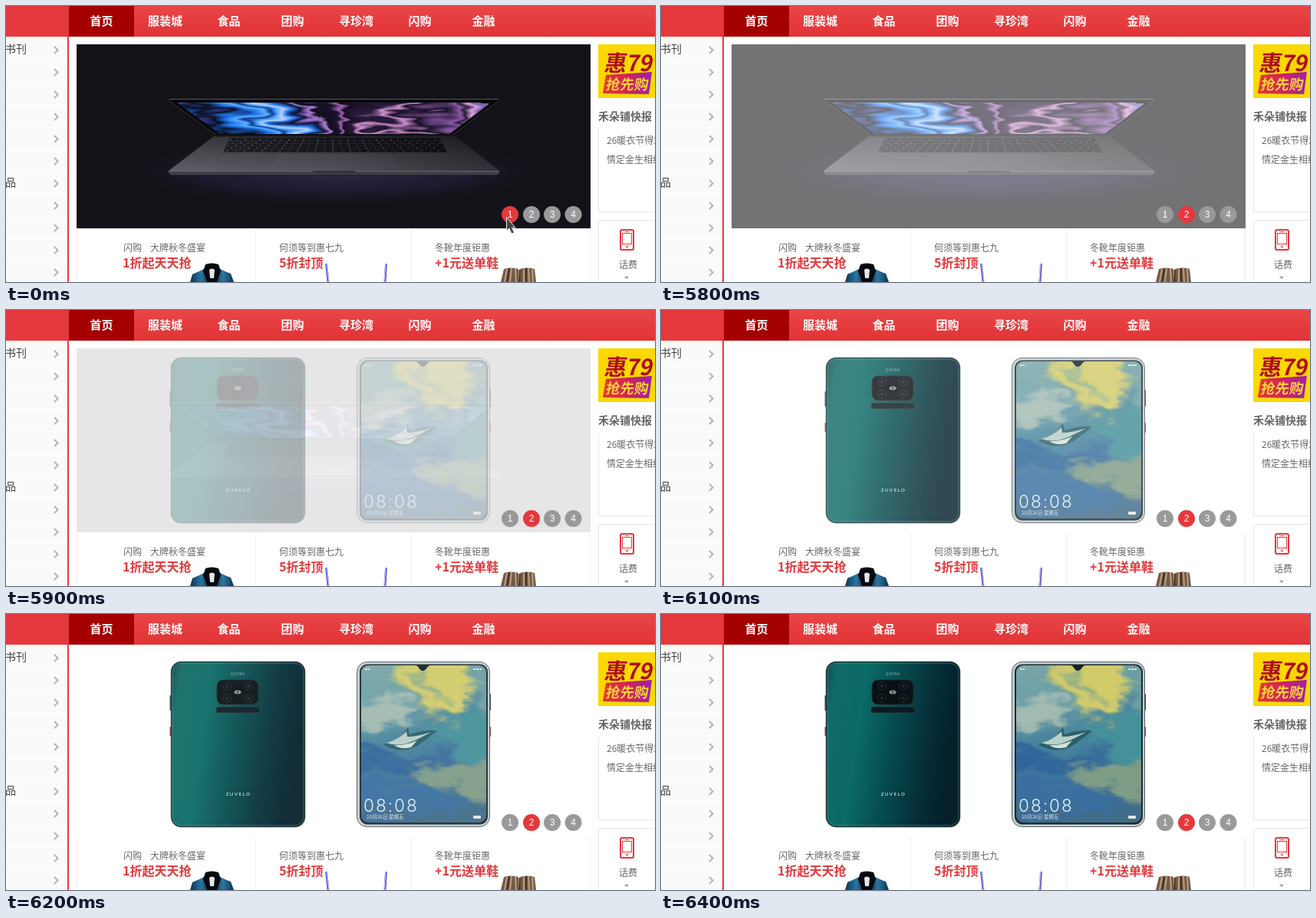
Animation, 846 px wide and 360 px high, one loop 8000 ms. Source, as an HTML page:

```html
<!DOCTYPE html>
<html lang="zh-CN">
<head>
<meta charset="utf-8">
<title>商城首页</title>
<style>
html, body { margin: 0; width: 100%; height: 100%; overflow: hidden; background: #fff; }
svg { display: block; width: 100vw; height: 100vh; font-family: "Noto Sans CJK SC", "Noto Sans CJK", sans-serif; }
.nav { font-size: 15px; font-weight: 700; fill: #fff; text-anchor: middle; }
.side { font-size: 14px; fill: #444; }
.small { font-size: 12px; fill: #666; }
.deal { font-size: 16px; font-weight: 700; fill: #e4393c; }
.page { font: 12px "Liberation Sans", Arial, sans-serif; fill: #fff; text-anchor: middle; }
.clock { font: 300 22.5px Inter, sans-serif; letter-spacing: 2px; fill: #e8f0ee; }
</style>
</head>
<body>
<svg viewBox="0 0 846 360" preserveAspectRatio="none">
  <defs>
    <linearGradient id="bar" x2="0" y2="1"><stop stop-color="#e94547"/><stop offset="1" stop-color="#e13335"/></linearGradient>
    <linearGradient id="deck" x2="0" y2="1"><stop stop-color="#2c2b32"/><stop offset=".55" stop-color="#45434b"/><stop offset="1" stop-color="#55535c"/></linearGradient>
    <linearGradient id="shade"><stop stop-color="#fff" stop-opacity=".06"/><stop offset=".5" stop-color="#000" stop-opacity=".05"/><stop offset="1" stop-color="#000" stop-opacity=".42"/></linearGradient>
    <linearGradient id="flow" x2="1" y2=".12">
      <stop stop-color="#0a0b18"/><stop offset=".07" stop-color="#3a3f9a"/><stop offset=".12" stop-color="#0b0e20"/>
      <stop offset=".17" stop-color="#1d6fe6"/><stop offset=".23" stop-color="#58b4ff"/><stop offset=".27" stop-color="#123a94"/>
      <stop offset=".31" stop-color="#3f9cff"/><stop offset=".36" stop-color="#b9d2ff"/><stop offset=".4" stop-color="#2a7df0"/>
      <stop offset=".45" stop-color="#0b1233"/><stop offset=".49" stop-color="#b07fd8"/><stop offset=".51" stop-color="#120d20"/>
      <stop offset=".57" stop-color="#1b1230"/><stop offset=".6" stop-color="#a868b8"/><stop offset=".62" stop-color="#160e22"/>
      <stop offset=".7" stop-color="#2a1a3c"/><stop offset=".73" stop-color="#d090d0"/><stop offset=".76" stop-color="#170f24"/>
      <stop offset=".84" stop-color="#8a5aa8"/><stop offset=".88" stop-color="#2a1a3a"/><stop offset=".94" stop-color="#d8a0dc"/><stop offset="1" stop-color="#7a62b4"/>
    </linearGradient>
    <radialGradient id="glow"><stop stop-color="#332f52" stop-opacity=".8"/><stop offset=".6" stop-color="#242140" stop-opacity=".55"/><stop offset="1" stop-color="#14131a" stop-opacity="0"/></radialGradient>
    <linearGradient id="back" x2="1" y2=".18"><stop stop-color="#0c4a4a"/><stop offset=".08" stop-color="#126a66"/><stop offset=".3" stop-color="#0b6b66"/><stop offset=".55" stop-color="#064c4f"/><stop offset=".8" stop-color="#05303a"/><stop offset="1" stop-color="#04202b"/></linearGradient>
    <linearGradient id="paint" x2=".25" y2="1"><stop stop-color="#86aaa8"/><stop offset=".3" stop-color="#6a9fa6"/><stop offset=".55" stop-color="#46839c"/><stop offset=".8" stop-color="#3a6c98"/><stop offset="1" stop-color="#426c84"/></linearGradient>
    <linearGradient id="ribbon"><stop stop-color="#e43a2c"/><stop offset=".5" stop-color="#cf2260"/><stop offset="1" stop-color="#9c22a8"/></linearGradient>
    <linearGradient id="coat"><stop stop-color="#0f3352"/><stop offset=".25" stop-color="#2a76a2"/><stop offset=".5" stop-color="#0d2236"/><stop offset=".75" stop-color="#2a76a2"/><stop offset="1" stop-color="#0f3352"/></linearGradient>
    <filter id="marble" x="0" y="0" width="1" height="1" color-interpolation-filters="sRGB">
      <feTurbulence type="fractalNoise" baseFrequency=".008 .045" numOctaves="3" seed="8"/>
      <feDisplacementMap in="SourceGraphic" scale="190" xChannelSelector="R" yChannelSelector="G"/>
    </filter>
    <filter id="brush" x="0" y="0" width="1" height="1" color-interpolation-filters="sRGB">
      <feGaussianBlur in="SourceGraphic" stdDeviation="5" result="base"/>
      <feTurbulence type="fractalNoise" baseFrequency=".02 .04" numOctaves="4" seed="3"/>
      <feDisplacementMap in="base" scale="60" xChannelSelector="R" yChannelSelector="G"/>
    </filter>
    <filter id="soft"><feGaussianBlur stdDeviation=".7"/></filter>
    <clipPath id="lcd"><path d="M223 126H632L578 167H279Z"/></clipPath>
    <clipPath id="glass"><rect x="463" y="67" width="163" height="205" rx="9"/></clipPath>
    <clipPath id="ad"><rect x="772" y="50" width="74" height="70"/></clipPath>
  </defs>

  <rect width="846" height="360" fill="#fff"/>

  <rect width="846" height="40" fill="url(#bar)"/>
  <rect width="82" height="40" fill="#e4393c"/>
  <rect x="82" width="85" height="40" fill="#a40000"/>
  <g id="nav"></g>

  <rect y="40" width="80" height="320" fill="#fafafa"/>
  <g id="side"></g>
  <rect x="80" y="40" width="2" height="320" fill="#e4393c"/>
  <text class="side" x="-1" y="61">书刊</text>
  <text class="side" x="-1" y="235">品</text>

  <g id="laptop">
    <rect x="92" y="50" width="670" height="240" fill="#131218"/>
    <ellipse cx="430" cy="216" rx="290" ry="46" fill="url(#glow)"/>
    <path d="M214 121H641L643 124L584 169H272L212 124Z" fill="#08080b"/>
    <path d="M213 121.500H642" stroke="#5c5a62"/>
    <path d="M212 123L273 168M643 123L583 168" stroke="#3c3a42"/>
    <g clip-path="url(#lcd)">
      <rect x="123" y="26" width="610" height="242" fill="#0d0a16"/>
      <path d="M223 26H632V268H223Z" fill="url(#flow)" filter="url(#marble)"/>
    </g>
    <path d="M272 169H584L643 215H212Z" fill="url(#deck)"/>
    <path d="M292 172H565L575 191H283Z" fill="#121218"/>
    <g id="keys"></g>
    <path d="M354 193H502L512 213H344Z" fill="#5a5861" opacity=".25"/>
    <path d="M272 169H584L643 215H212Z" fill="url(#shade)"/>
    <rect x="408" y="167" width="13" height="4" fill="#060608"/>
    <path d="M272 169.500H584" stroke="#1b1a20" stroke-width="2"/>
    <path d="M212 215H643V218L638 221H217L212 218Z" fill="#403e48"/>
    <path d="M212 215.500H643" stroke="#66646e"/>
    <path d="M215 220.500H640" stroke="#25232d"/>
    <rect x="400" y="215" width="55" height="3" fill="#34323b"/>
  </g>

  <g id="phones">
    <rect x="213.500" y="106" width="3" height="20" rx="1" fill="#27494c"/>
    <rect x="213.500" y="147" width="3" height="12" rx="1" fill="#8a3a38"/>
    <rect x="215.500" y="62.500" width="174" height="215" rx="13" fill="url(#back)" stroke="#20393d" stroke-width="1.500"/>
    <rect x="217.500" y="64.500" width="170" height="211" rx="11" fill="none" stroke="#5ea09b" stroke-opacity=".35"/>
    <text x="302" y="80" font-size="5" fill="#8fb0ae" text-anchor="middle" letter-spacing=".4">QOVRA</text>
    <rect x="275" y="86" width="54" height="32" rx="8" fill="#0a1014" stroke="#1d2c30"/>
    <g id="lenses"></g>
    <rect x="274" y="121" width="57" height="8" rx="2" fill="#0b1c21" stroke="#2c4a4d" stroke-width=".7"/>
    <text x="303" y="236.500" font-family="Lato, sans-serif" font-size="6" font-weight="700" fill="#c3d3d1" text-anchor="middle" letter-spacing="1.500">ZUVELO</text>

    <rect x="629" y="104" width="3" height="22" rx="1" fill="#39484c"/>
    <rect x="629" y="147" width="3" height="13" rx="1" fill="#a03836"/>
    <rect x="457.500" y="62.500" width="173" height="215" rx="13" fill="#c3cdcf" stroke="#566166"/>
    <rect x="461" y="65.500" width="167" height="209" rx="10" fill="#1f2a2e"/>
    <g clip-path="url(#glass)">
      <g filter="url(#brush)">
        <rect x="432" y="37" width="224" height="266" fill="url(#paint)"/>
        <path d="M496 40H592L606 100L590 138L555 128L520 100Z" fill="#d2cb6a"/>
        <path d="M520 66L546 96L580 118L570 90Z" fill="#8fae88"/>
        <path d="M604 40H656V150L616 132Z" fill="#6d9ea4"/>
        <path d="M432 130L490 100L545 128L470 150Z" fill="#a2bbb0"/>
        <path d="M550 150L656 128V182L590 186Z" fill="#45919a"/>
        <path d="M432 172L520 192L570 184L600 208L470 206Z" fill="#2f659a"/>
        <path d="M520 205L600 190L656 175V240L580 236Z" fill="#7f9c86"/>
        <path d="M432 214L540 224L620 262L432 256Z" fill="#3a6fa0"/>
      </g>
      <g filter="url(#soft)">
        <path d="M491 170Q506 168 514 160L524 148L526 157Q544 151 562 152Q548 164 536 172Q514 184 491 170Z" fill="#2a5f68"/>
        <path d="M496 168Q510 165 522 153L523 160Q536 160 554 154Q540 162 530 166Q512 174 496 168Z" fill="#b9cec6"/>
        <path d="M506 171Q520 172 536 165L528 174Q514 177 506 171Z" fill="#d6e2d8"/>
      </g>
      <path d="M530 66Q537 67 538 70Q543 78 549 70Q550 67 557 66Z" fill="#182226"/>
      <path d="M468 72H474M609 72H620" stroke="#dce6e4" stroke-width="2" stroke-dasharray="3 1"/>
      <text class="clock" x="466" y="258">08:08</text>
      <text x="470" y="267" font-size="6.500" fill="#e3ecea">10月26日 星期五</text>
      <rect x="609" y="263" width="10" height="4" rx="1" fill="#dde7e2"/>
    </g>
  </g>

  <g id="pager"></g>

  <path d="M92.500 291V360M325.500 291V360M528.500 291V360M761.500 291V360" stroke="#eee"/>
  <text class="small" x="153" y="320">闪购</text>
  <text class="small" x="188" y="320">大牌秋冬盛宴</text>
  <text class="deal" x="152" y="341">1折起天天抢</text>
  <text class="small" x="356" y="320">何须等到惠七九</text>
  <text class="deal" x="356" y="341">5折封顶</text>
  <text class="small" x="559" y="320">冬靴年度钜惠</text>
  <text class="deal" x="559" y="341">+1元送单鞋</text>

  <path d="M240 360L243 350Q250 347 258 343H279Q287 347 293 349L297 360Z" fill="url(#coat)"/>
  <path d="M257 346L260 337Q268 334 277 337L280 346L275 360H262Z" fill="#07090d"/>
  <path d="M265 344Q268 341 272 344L271 355H266Z" fill="#e4e8ec"/>
  <path d="M417.500 336L420 360M495.500 336L494 360" stroke="#6a6ad2" stroke-width="3"/>
  <path d="M418.500 336L421 360M494.500 336L493 360" stroke="#c9c9f2"/>
  <path d="M645 360L649 343Q659 340 668 343L669 360ZM670 360V343Q680 340 689 343L691 360Z" fill="#765a44"/>
  <path d="M653 343L650 360M659 342L657 360M664 342L665 360M675 343V360M681 342L682 360M686 343L687 360" stroke="#b9a288" stroke-width="2"/>
  <path d="M656 343L653 360M678 342V360M669.500 344V360" stroke="#33271f" stroke-width="1.500"/>

  <g clip-path="url(#ad)">
    <rect x="772" y="50" width="74" height="70" fill="#fbd800"/>
    <text transform="translate(779 85) skewX(-10)" font-size="29" font-weight="900" fill="#b00d16">惠79</text>
    <path d="M782 90L842 86L838 115L778 114Z" fill="url(#ribbon)"/>
    <text transform="translate(781 109) skewX(-10)" font-size="18.500" font-weight="700" fill="#ffd238">抢先购</text>
  </g>
  <text x="772" y="149" font-size="14" font-weight="700" fill="#666">禾朵铺快报</text>
  <path d="M846 268.500H772.500V160M846 279.500H772.500V360" fill="none" stroke="#e6e6e6"/>
  <text class="small" x="783" y="180">26暖衣节得2</text>
  <text class="small" x="783" y="205">情定金生相约</text>
  <g fill="none" stroke="#e4393c">
    <rect x="801" y="292" width="17" height="26" rx="2" stroke-width="2"/>
    <rect x="803.500" y="296.500" width="12" height="14"/>
    <path d="M807 294.500H812"/>
    <circle cx="809.500" cy="314" r="1.200"/>
  </g>
  <text class="small" x="799" y="342">话费</text>
  <path d="M806 353H812L809 356Z" fill="#999"/>

  <path id="cursor" d="M652.500 275.500V293L656 290L659 297L662.500 295.500L659.500 289H664Z" fill="#444" stroke="#eee"/>
</svg>
<script>
const $ = id => document.getElementById(id);
const fill = (id, list, draw) => { $(id).innerHTML = list.map(draw).join(''); };
const range = n => [...Array(n).keys()];

fill('nav', ['首页', '服装城', '食品', '团购', '寻珍湾', '闪购', '金融'],
  (s, i) => `<text class="nav" x="${124.5 + 83 * i}" y="25">${s}</text>`);

fill('side', range(11), i => {
  const y = 57.5 + 29 * i;
  return `<rect y="${y + 13.5}" width="80" height="1" fill="#fff"/>
    <path d="M63 ${y - 4.5}L67.500 ${y}L63 ${y + 4.5}" fill="none" stroke="#b4b4b4" stroke-width="2"/>`;
});

fill('keys', range(5), i => {
  const y = 174.5 + 3.6 * i, d = 2 * i;
  return `<path d="M${292 - d} ${y}H${565 + d}" stroke="#6a6874" stroke-dasharray="2 ${7 + i} 1 9" stroke-dashoffset="${i * 5}"/>
    <path d="M${292 - d} ${y + 1.5}H${565 + d}" stroke="#33323c" stroke-width=".7"/>`;
});

fill('lenses', [[288, 94], [316, 94], [288, 110], [316, 110]], ([x, y]) =>
  `<circle cx="${x}" cy="${y}" r="5.500" fill="#0c1418" stroke="#1c282d"/><circle cx="${x}" cy="${y}" r="1.500" fill="#26353c"/>`);
$('lenses').innerHTML += '<ellipse cx="302" cy="102" rx="4.500" ry="2.500" fill="#8d9a9a"/><circle cx="302" cy="102" r="1.500" fill="#3c494b"/>';

fill('pager', [657, 685, 712, 739.5], (x, i) =>
  `<circle cx="${x}" cy="272" r="11"/><text class="page" x="${x}" y="276">${i + 1}</text>`);
const dots = $('pager').querySelectorAll('circle');

const LOOP = 8000, HIDE = 700, SWAP = 5800, STEP = 100;
const fadeOut = [.59, .1];
const fadeIn = [0, .28, .62, .82, .94, .98, 1];

function render(t) {
  const n = Math.floor((t - SWAP) / STEP);
  const swapped = n >= 0;
  $('cursor').style.display = t < HIDE ? '' : 'none';
  $('laptop').style.opacity = swapped ? fadeOut[n] ?? 0 : 1;
  $('phones').style.opacity = swapped ? fadeIn[n] ?? 1 : 0;
  dots.forEach((dot, i) => dot.setAttribute('fill', i === +swapped ? '#e4393c' : '#999'));
}

const start = performance.now();
function tick() {
  render((performance.now() - start) % LOOP);
  requestAnimationFrame(tick);
}
tick();
</script>
</body>
</html>
```
